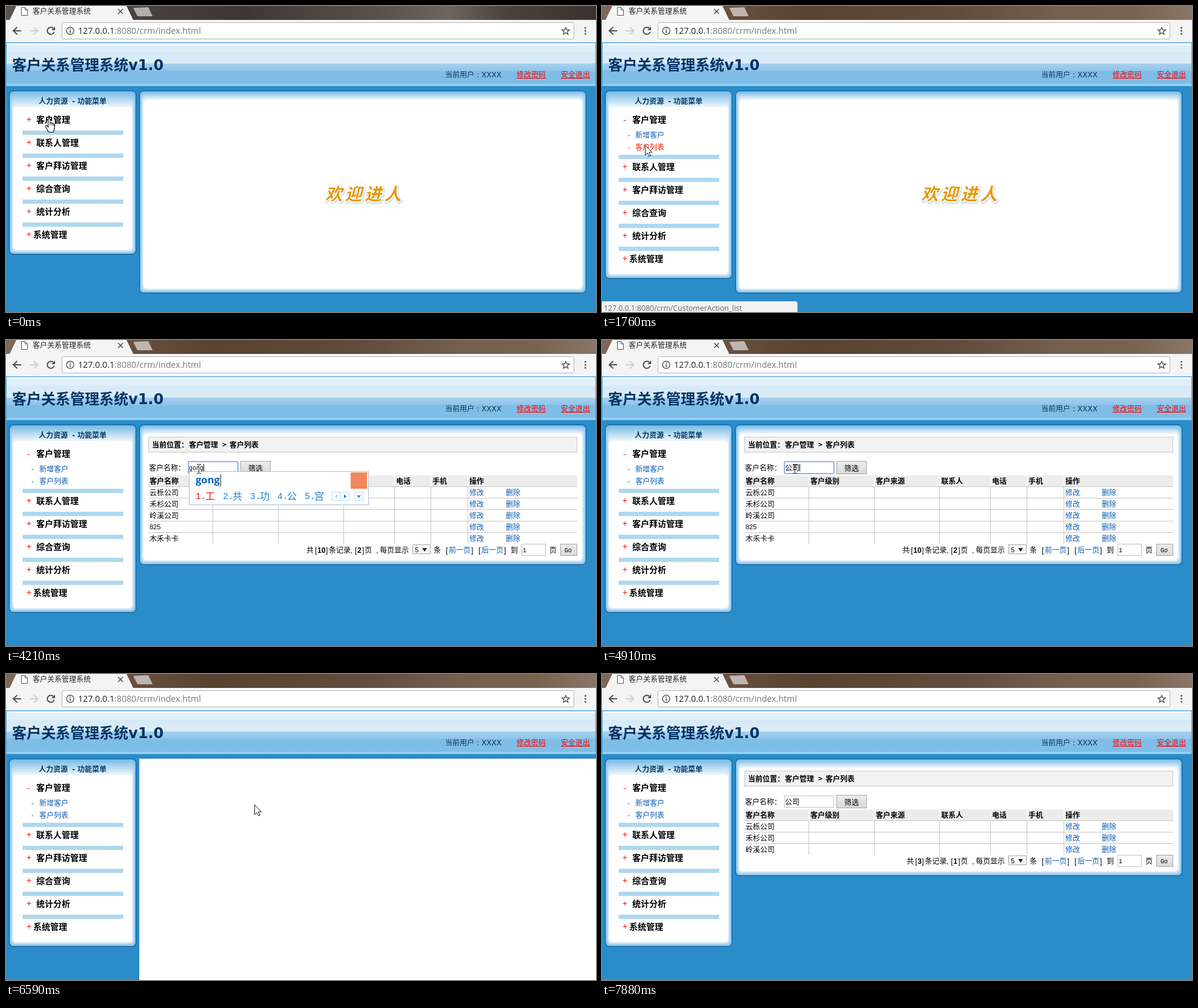
An HTML page with a canvas that plays this animation: 974x506 px, repeating every 8000 ms.

```html
<!DOCTYPE html>
<html lang="zh-CN">
<head>
<meta charset="utf-8">
<title>客户关系管理系统</title>
<style>
html, body { margin: 0; width: 100%; height: 100%; overflow: hidden; background: #2a8cc9; }
canvas { display: block; }
</style>
</head>
<body>
<canvas id="stage" width="974" height="506"></canvas>
<script>
const g = document.getElementById('stage').getContext('2d');
const LOOP = 8000;
const UI = '"DejaVu Sans", "Noto Sans CJK SC", "Noto Sans CJK", sans-serif';
const CJK = '"Noto Sans CJK SC", "Noto Sans CJK", sans-serif';
const HUM = '"Open Sans", "Noto Sans CJK SC", sans-serif';
const SMALL = '"Liberation Sans", "Noto Sans CJK SC", sans-serif';
const MONO = '"Liberation Mono", "Noto Sans CJK SC", monospace';
const LINK = '#0a5bb0', RED = '#f00';

// ---------- helpers ----------
function rect(x, y, w, h, fill) { g.fillStyle = fill; g.fillRect(x, y, w, h); }

function frame(x, y, w, h, stroke, fill) {
  if (fill) rect(x, y, w, h, fill);
  g.strokeStyle = stroke;
  g.lineWidth = 1;
  g.strokeRect(x + .5, y + .5, w - 1, h - 1);
}

function round(x, y, w, h, r, fill) {
  g.beginPath();
  g.roundRect(x, y, w, h, r);
  g.fillStyle = fill;
  g.fill();
}

function poly(points, fill, stroke, width = 1) {
  g.beginPath();
  points.forEach(([x, y], i) => i ? g.lineTo(x, y) : g.moveTo(x, y));
  if (fill) { g.closePath(); g.fillStyle = fill; g.fill(); }
  if (stroke) { g.strokeStyle = stroke; g.lineWidth = width; g.stroke(); }
}

function ring(x, y, r, stroke, width, from = 0, to = 7) {
  g.beginPath();
  g.arc(x, y, r, from, to);
  g.strokeStyle = stroke;
  g.lineWidth = width;
  g.stroke();
}

// cy is the middle of the line
function text(s, x, cy, size = 12, color = '#000', style = '', font = UI) {
  g.font = `${style} ${size}px ${font}`;
  g.fillStyle = color;
  g.fillText(s, x, Math.round(cy + size * .4));
}
const bold = (s, x, cy, size = 12, color = '#000') => text(s, x, cy, size, color, 'bold');

function gradient(x0, y0, x1, y1, stops) {
  const gr = g.createLinearGradient(x0, y0, x1, y1);
  stops.forEach(([at, color]) => gr.addColorStop(at, color));
  return gr;
}

const mix = (a, b, k) => `rgb(${a.map((v, i) => Math.round(v + (b[i] - v) * k))})`;

// ---------- browser ----------
function browser(lit) {
  const strip = lit
    ? [[0, '#7d685b'], [.2, '#6a5142'], [.35, '#59422f'], [.6, '#614b3b'], [.78, '#75604f'], [.9, '#78634f'], [1, '#8a7666']]
    : [[0, '#5a5350'], [.2, '#4a4340'], [.4, '#3e3632'], [.62, '#57504a'], [.75, '#6d655e'], [.85, '#4b423d'], [1, '#3b322e']];
  rect(0, 0, 974, 23, gradient(0, 0, 974, 0, strip));
  poly([[6, 23], [17, 0], [199, 0], [210, 23]], '#f4f4f4');
  poly([[210, 3], [235, 2], [242, 17], [217, 17]], lit ? '#c0b6af' : '#b3aeab');
  poly([[25.5, 2.5], [31.5, 2.5], [35.5, 6.5], [35.5, 15.5], [25.5, 15.5], [25.5, 2.5]], '#fff', '#555');
  poly([[31.5, 2.5], [31.5, 6.5], [35.5, 6.5]], null, '#555');
  text('客户关系管理系统', 44, 8.5, 12, '#222', '', CJK);
  poly([[185, 5], [193, 13]], null, '#555', 1.6);
  poly([[193, 5], [185, 13]], null, '#555', 1.6);

  rect(0, 23, 974, 37, '#f4f4f4');
  g.beginPath();
  g.roundRect(92.5, 27.5, 845, 27, 2);
  g.fillStyle = '#fff'; g.fill();
  g.strokeStyle = '#b4b4b4'; g.lineWidth = 1; g.stroke();
  poly([[18.5, 35], [12, 41], [18.5, 47]], null, '#505050', 2);
  poly([[12, 41], [25, 41]], null, '#505050', 2);
  poly([[46, 35], [52.5, 41], [46, 47]], null, '#cfcfcf', 2);
  poly([[52.5, 41], [39, 41]], null, '#cfcfcf', 2);
  ring(74, 41, 5.8, '#505050', 2, .3, 5.5);
  poly([[81, 34], [81, 40], [75, 40]], '#505050');
  ring(106, 41, 6, '#555', 1.4);
  rect(105.2, 40, 1.7, 4.5, '#555');
  rect(105.2, 37, 1.7, 1.7, '#555');
  text('127.0.0.1', 119, 40, 14.2, '#222', '', HUM);
  const w = g.measureText('127.0.0.1').width;
  text(':8080/crm/index.html', 119 + w, 40, 14.2, '#777', '', HUM);
  const star = Array.from({ length: 11 }, (_, i) => {
    const a = i * Math.PI / 5 - Math.PI / 2, r = i % 2 ? 2.8 : 6.5;
    return [924 + r * Math.cos(a), 41.5 + r * Math.sin(a)];
  });
  poly(star, null, '#555', 1.4);
  for (const y of [36, 41, 46]) round(955, y - 1.5, 3, 3, 1.5, '#555');
}

function banner() {
  rect(0, 60, 974, 73, '#4aaae0');
  rect(1, 61, 972, 71, gradient(0, 61, 0, 132, [
    [0, '#7cc3ea'], [.02, '#f4fafd'], [.045, '#f4fafd'], [.06, '#dceef9'], [.2, '#e0f0f9'],
    [.22, '#d5e9f6'], [.47, '#dcedf7'], [.49, '#a6d0ed'], [.65, '#8fc5ea'], [.66, '#7fbde6'],
    [.94, '#7dbee8'], [.98, '#a0d5f3'], [1, '#8bcaf0']]));
  bold('客户关系管理系统v1.0', 10, 96, 24, '#003366');
  text('当前用户', 725, 113.5, 12, '#15334f');
  text(':', 777, 113.5, 12, '#15334f');
  text('XXXX', 785, 113.5, 12, '#15334f');
  for (const [s, x] of [['修改密码', 843], ['安全退出', 916]]) {
    text(s, x, 113.5, 12, RED);
    rect(x, 119, 48, 1, RED);
  }
}

// Rounded white box with a soft blue inner glow
function panel(x, y, w, h, top) {
  round(x - 1, y - 1, w + 2, h + 2, 7, '#075a94');
  const n = 14;
  for (let i = 0; i <= n; i++) {
    const k = i / n, s = k * 6;
    round(x + s, y + k * top, w - 2 * s, h - k * (top + 7), 6,
      mix([122, 188, 231], [255, 255, 255], i < n ? k * .92 : 1));
  }
}

// ---------- left menu ----------
const GROUPS = ['客户管理', '联系人管理', '客户拜访管理', '综合查询', '统计分析', '系统管理'];

function menu(open, hover) {
  const shift = open ? 40 : 0;
  panel(6, 141, 208, 269 + shift, 26);
  for (const [s, x] of [['人力资源', 54], ['-', 109], ['功能菜单', 118]]) bold(s, x, 157, 12, '#003a68');
  GROUPS.forEach((name, i) => {
    const y = 188 + i * 38 + (i ? shift : 0), last = i === 5;
    const isOpen = open && !i;
    text(isOpen ? '-' : '+', isOpen ? 35 : 34, y - .5, 14, RED, '', CJK);
    bold(name, last ? 45 : 50, y - .5, 14);
    if (last) return;
    for (let x = 28; x < 194; x += 2) rect(x, 206 + i * 38 + shift, 1, 7, '#5fb0de');
  });
  if (!open) return;
  ['新增客户', '客户列表'].forEach((s, i) => {
    const color = hover === i ? '#e62200' : LINK;
    text('-', 42, 213 + i * 20, 12, color, '', CJK);
    text(s, 55, 213 + i * 20, 12, color);
  });
}

// ---------- right side ----------
function welcome() {
  panel(221, 141, 736, 333, 14);
  g.lineJoin = 'round';
  [...'欢迎进人'].forEach((c, i) => {
    const x = 527 + i * 32.5;
    g.font = `italic bold 28px ${CJK}`;
    g.strokeStyle = '#d3e6ef';
    g.lineWidth = 5;
    g.strokeText(c, x + 1, 323);
    g.strokeStyle = '#fff';
    g.lineWidth = 3;
    g.strokeText(c, x, 321);
    g.fillStyle = '#e69a08';
    g.fillText(c, x, 321);
  });
  g.lineJoin = 'miter';
}

const HEADS = [['客户名称', 237], ['客户级别', 344], ['客户来源', 452], ['联系人', 560],
  ['电话', 644], ['手机', 704], ['操作', 765]];
const CLIENTS = ['云栎公司', '禾杉公司', '岭溪公司', '825', '木禾卡卡'];

function button(x, y, w, h) {
  frame(x, y, w, h, '#a6a6a6', gradient(0, y, 0, y + h, [[0, '#ececec'], [1, '#d9d9d9']]));
}

function focusRing(x, y, w, h) {
  g.strokeStyle = '#7aa7ee';
  g.lineWidth = 1.6;
  g.beginPath();
  g.roundRect(x, y, w, h, 2);
  g.stroke();
}

function list(s) {
  const rows = s.filtered ? 3 : 5, bottom = 242 + rows * 19;
  panel(221, 141, 736, bottom + 34 - 141, 14);
  frame(235, 160, 708, 26, '#c9c9c9', '#f2f2f2');
  bold('当前位置：', 241, 173);
  bold('客户管理', 302, 173);
  text('>', 357, 173, 12, '#000', 'bold', CJK);
  bold('客户列表', 369, 173);

  text('客户名称：', 236, 211);
  frame(301, 201, 82, 20, '#c4c4c4', '#fff');
  button(387, 200, 50, 22);
  text('筛选', 400, 212);
  if (s.focus === 'input') focusRing(301, 201, 82, 20);
  if (s.focus === 'button') focusRing(387, 200, 50, 22);
  const typed = s.ime ? s.ime.keys : '';
  if (typed) {
    text(typed, 302, 211, 10, '#000', '', MONO);
    rect(302, 217, typed.length * 6, 1, '#777');
  } else if (s.value) text(s.value, 302, 211);
  if (s.caret) rect(302 + typed.length * 6 + s.value.length * 12, 205, 1, 12, '#000');

  rect(235, 224, 708, 18, '#ececec');
  HEADS.forEach(([name, x], i) => {
    bold(name, x, 233);
    if (!i) return;
    rect(x - 3, 224, 1, 18, '#fff');
    rect(x - 3, 242, 1, bottom - 242, '#c6c6c6');
  });
  CLIENTS.slice(0, rows).forEach((name, i) => {
    const y = 252 + i * 19;
    rect(235, y - 10, 708, 1, '#c6c6c6');
    const num = /^\d/.test(name);
    text(name, 237, y, num ? 11 : 12, '#000', '', num ? SMALL : UI);
    text('修改', 765, y, 12, LINK);
    text('删除', 825, y, 12, LINK);
  });
  pager(bottom + 10, s.filtered ? '3' : '10', s.filtered ? '1' : '2');
}

function pager(y, total, pages) {
  const put = (str, x, color) => text(str, x, y, 12, color, '', SMALL);
  const num = (str, x) => text(str, x, y, 12, '#000', 'bold', SMALL);
  const x = 528 - total.length * 7;
  put('共', x - 18);
  put('[', x - 4);
  num(total, x);
  put(']', 528);
  put('条记录,', 533);
  put('[', 576);
  num(pages, 580);
  put(']', 588);
  put('页', 592);
  put(',', 611);
  put('每页显示', 617);
  frame(671, y - 9, 30, 16, '#a6a6a6', '#f7f7f7');
  text('5', 675, y - .5, 11, '#000', '', SMALL);
  poly([[687, y - 3], [695, y - 3], [691, y + 3]], '#222');
  put('条', 706);
  [['前一页', 726], ['后一页', 780]].forEach(([str, at]) => {
    put('[', at);
    put(str, at + 5, LINK);
    put(']', at + 42);
  });
  put('到', 833);
  frame(851, y - 10, 40, 20, '#bdbdbd', '#fff');
  text('1', 853, y, 10, '#000', '', MONO);
  put('页', 897);
  button(915, y - 10, 28, 20);
  text('Go', 922, y, 10, '#000', '', MONO);
}

// ---------- input method ----------
const WORDS = ['公司', '公式', '工时', '攻势', '工'];
const IME = [
  [3970, 'g', ['个', '更', '高', '过', '该']],
  [4090, 'go', ['公司', '工作', '公共', '公开', '够']],
  [4210, 'gong', ['工', '共', '功', '公', '宫']],
  [4490, 'gongs', WORDS],
  [4630, 'gongsi', WORDS],
].map(([at, keys, words]) => ({ at, keys, words }));

function imeBox({ keys, words }) {
  const step = c => 29 + c.length * 16;
  const end = words.reduce((x, c) => x + step(c), 313);
  frame(302, 217, end - 241, 56, '#a9bfd3', '#fff');
  const shown = keys.replace(/^(gong)(s)/, "$1'$2");
  text(shown, 313, 230, 16.6, '#0a5fc4', 'bold', HUM);
  rect(314 + g.measureText(shown).width, 222, 1, 20, '#222');
  let x = 313;
  words.forEach((c, i) => {
    const color = i ? '#1583d8' : '#f01010';
    text(i + 1 + '.', x, 257.5, 14.5, color, '', MONO);
    text(c, x + 16, 257.5, 16, color, '', CJK);
    x += step(c);
  });
  for (const dx of [0, 14, 37]) frame(x + dx, 251, 15, 15, '#bcdcf2');
  poly([[x + 9, 255], [x + 9, 262], [x + 5, 258.5]], '#b5d6ee');
  poly([[x + 20, 255], [x + 20, 262], [x + 24, 258.5]], '#1583d8');
  poly([[x + 41, 257], [x + 48, 257], [x + 44.5, 261]], '#1583d8');
  rect(x + 31, 219, 27, 27, '#f2895c');
}

// ---------- pointer ----------
// time, x, y, kind
const PATH = [
  [0, 71, 187, 'hand'], [930, 71, 191, 'hand'], [1070, 71, 201, 'arrow'], [1200, 72, 213, 'hand'],
  [1340, 71, 224, 'hand'], [1480, 71, 230, 'hand'], [1760, 71, 230, 'arrow'],
  [2220, 110, 229, 'arrow'], [2370, 194, 223, 'arrow'], [2520, 282, 216, 'arrow'],
  [2680, 317, 213, 'beam'], [2830, 318, 212, 'beam'],
  [5500, 326, 212, 'beam'], [5660, 347, 212, 'beam'], [5810, 374, 213, 'beam'],
  [5970, 395, 214, 'arrow'], [6130, 406, 215, 'arrow'], [6280, 410, 216, 'arrow'],
  [7300, 434, 233, 'arrow'], [7450, 520, 296, 'arrow'], [7590, 680, 390, 'arrow'],
  [7740, 901, 484, 'arrow'], [7880, 0, 0, 'none'],
];

const SHAPES = {
  arrow() {
    poly([[.5, .5], [.5, 16.5], [4, 13], [6.5, 18.5], [9, 17.5], [6.5, 12], [11.5, 12], [.5, .5]], '#fff', '#1a1a2a');
  },
  hand() {
    poly([[-1.5, 0], [.5, -1], [2, .5], [2, 6], [5, 6.5], [8, 8], [9.5, 10], [9, 15], [7.5, 21.5], [-.5, 21.5],
      [-5.5, 13], [-5, 10.5], [-3, 11], [-1.5, 13], [-1.5, 0]], '#fff', '#111', 1.2);
    poly([[2, 6], [2, 10]], null, '#111');
    poly([[5, 7], [5, 11]], null, '#111');
    poly([[8, 8], [8, 12]], null, '#111');
  },
  beam() {
    rect(0, -6, 1, 14, '#222');
    for (const y of [-7, 8]) { rect(-3, y, 3, 1, '#222'); rect(1, y, 3, 1, '#222'); }
  },
  none() {},
};

const last = (items, t, key) => items.filter(i => i[key] <= t).pop();

function pointer(t) {
  const [, x, y, kind] = last(PATH, t, 0);
  g.save();
  g.translate(x, y);
  SHAPES[kind]();
  g.restore();
}

function status(hover) {
  if (hover < 0) return;
  g.beginPath();
  g.roundRect(-1.5, 488.5, 324, 20, 3);
  g.fillStyle = '#f2f2f2'; g.fill();
  g.strokeStyle = '#c8c8c8'; g.lineWidth = 1; g.stroke();
  const page = hover ? 'CustomerAction_list' : 'CustomerAction_add';
  text('127.0.0.1:8080/crm/' + page, 3, 499, 12.25, '#666', '', HUM);
}

// ---------- timeline ----------
const within = (t, a, b) => t >= a && t < b;

function draw(t) {
  const open = t >= 500;
  const hover = within(t, 1200, 1340) ? 0 : within(t, 1340, 2220) ? 1 : -1;
  const ime = within(t, 3970, 4910) ? last(IME, t, 'at') : null;
  rect(0, 0, 974, 506, '#2a8cc9');
  browser(open);
  banner();
  menu(open, hover);
  if (t < 1920) welcome();
  else if (within(t, 6590, 6740)) rect(220, 140, 754, 366, '#fff');
  else list({
    filtered: t >= 6740,
    value: t >= 4910 ? '公司' : '',
    focus: within(t, 3100, 6440) ? 'input' : within(t, 6440, 6590) ? 'button' : '',
    caret: within(t, 3100, 3510) || within(t, 3970, 5500) || within(t, 5970, 6440),
    ime,
  });
  status(hover);
  if (ime) imeBox(ime);
  pointer(t);
}

const start = performance.now();
function tick() {
  draw((performance.now() - start) % LOOP);
  requestAnimationFrame(tick);
}
tick();
</script>
</body>
</html>
```
